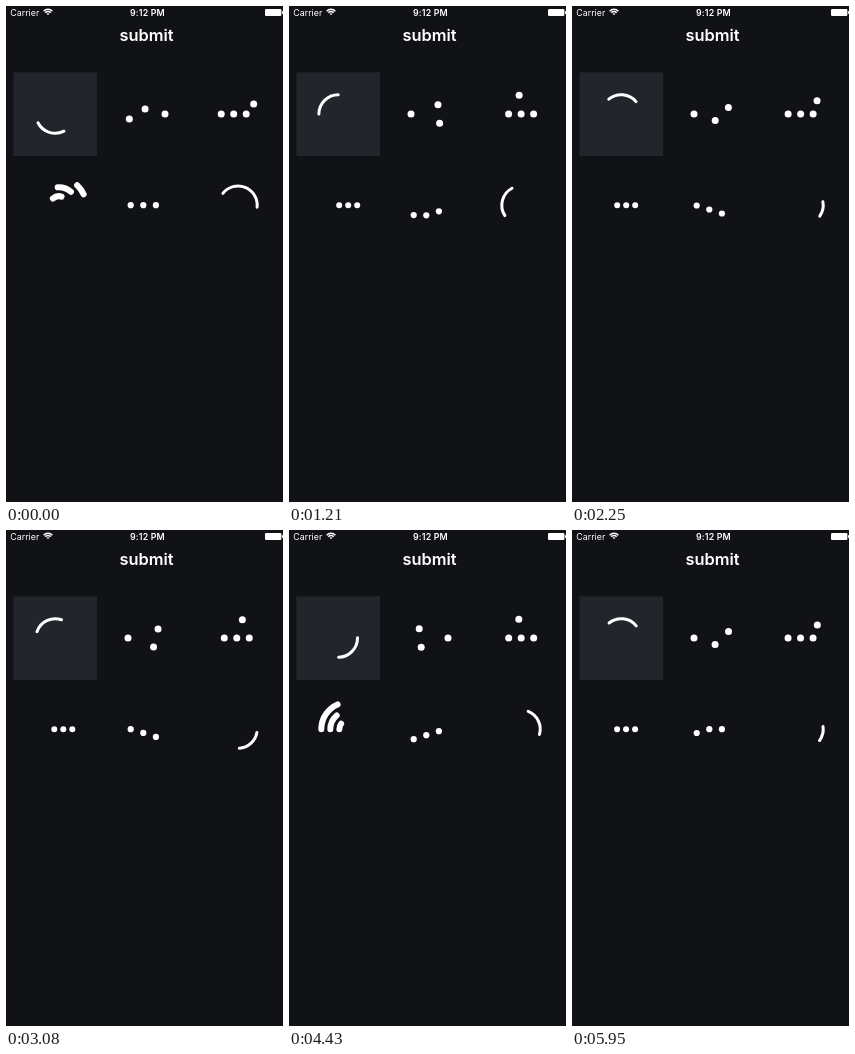
These frames come from a looping animation (277x496 px, 6.05 s). An HTML page:

```html
<!DOCTYPE html>
<html lang="en">
<head>
<meta charset="utf-8">
<title>submit</title>
<style>
  html, body { margin: 0; width: 100%; height: 100%; overflow: hidden; background: #111216; }
  svg { display: block; width: 277px; height: 496px; }
  text { font-family: Inter, Roboto, sans-serif; fill: #fff; }
  .line { fill: none; stroke: #fff; stroke-linecap: round; }
</style>
</head>
<body>
<svg id="stage" viewBox="0 0 277 496">
  <rect width="277" height="496" fill="#111216"/>
  <text x="4.3" y="9.7" font-size="8.86">Carrier</text>
  <g id="wifi"></g>
  <text x="141.5" y="9.7" font-size="8.86" font-weight="600" letter-spacing=".15" text-anchor="middle">9:12 PM</text>
  <rect x="259" y="3" width="16.4" height="7" rx="1.2" fill="#fff"/>
  <rect x="276" y="5.2" width="1" height="2.6" fill="#fff"/>
  <text x="140.5" y="34.7" font-size="16.4" font-weight="600" text-anchor="middle">submit</text>
  <rect x="7.4" y="66.4" width="83.6" height="83.6" fill="#22252c"/>
</svg>
<script>
const stage = document.getElementById('stage');
const ROW1 = 108, ROW2 = 199.2;
const LOOP = 6050, LAST = 5950, STEP = 27.7;

// Playback pace: [clock ms, animation seconds]
const PACE = [[0, 0], [1210, 1.325], [2250, 2.464], [3080, 3.378],
              [4430, 4.822], [5240, 5.678], [LAST, 6.467]];

const frac = x => x - Math.floor(x);
const clamp = x => Math.min(1, Math.max(0, x));

function add(name, attrs, parent = stage) {
  const el = document.createElementNS('http://www.w3.org/2000/svg', name);
  for (const key in attrs) el.setAttribute(key, attrs[key]);
  return parent.appendChild(el);
}
const dots = (n, r) => Array.from({ length: n }, () => add('circle', { r, fill: '#fff' }));
const line = (width, parent) => add('path', { class: 'line', 'stroke-width': width }, parent);

function place(dot, x, y) {
  dot.setAttribute('cx', x.toFixed(2));
  dot.setAttribute('cy', y.toFixed(2));
}

const polar = (cx, cy, r, deg) => {
  const a = deg * Math.PI / 180;
  return [cx + r * Math.cos(a), cy + r * Math.sin(a)];
};

// Clockwise arc between two angles in degrees
function arc(path, cx, cy, r, from, to) {
  to = Math.max(to, from + 0.2);
  const a = polar(cx, cy, r, from).map(v => v.toFixed(3));
  const b = polar(cx, cy, r, to).map(v => v.toFixed(3));
  path.setAttribute('d', `M${a}A${r} ${r} 0 ${to - from > 180 ? 1 : 0} 1 ${b}`);
}

// cubic-bezier(.42, 0, .58, 1)
function easeInOut(x) {
  x = clamp(x);
  let lo = 0, hi = 1;
  for (let i = 0; i < 20; i++) {
    const m = (lo + hi) / 2, n = 1 - m;
    if (1.26 * n * n * m + 1.74 * n * m * m + m * m * m < x) lo = m; else hi = m;
  }
  return lo * lo * (3 - 2 * lo);
}

const wifi = document.getElementById('wifi');
for (const r of [6, 3.7, 1.4]) {
  const p = line(1.5, wifi);
  p.style.strokeLinecap = 'butt';
  arc(p, 42, 9.3, r, 223, 317);
}

const submitArc = line(3);
const glassDots = dots(3, 3.5);
const walkDots = dots(4, 3.5);
const archLines = [27, 18, 9].map(() => line(6));
const bounceDots = dots(3, 3.1);
const orbitArc = line(3);

function drawSubmit(s) {
  const a = 63 + 360 * s;
  arc(submitArc, 49.2, ROW1, 19.3, a, a + 90);
}

// Two neighbours swap places by half a turn, right pair then left pair
function drawGlasses(q) {
  const right = q < 0.5;
  const cx = right ? 149.8 : 131.2, angle = 360 * q;
  place(glassDots[0], right ? 122 : 159, ROW1);
  place(glassDots[1], ...polar(cx, ROW1, 9.3, angle));
  place(glassDots[2], ...polar(cx, ROW1, 9.3, angle + 180));
}

// The first dot leaps over the row while the rest shift left
function drawWalk(q) {
  const p = frac(2 * q);
  for (let i = 0; i < 3; i++) place(walkDots[i], 225.5 + 12.5 * (i - p), ROW1);
  place(walkDots[3], ...polar(231.8, ROW1, 18.75, 180 + 180 * p));
}

// Rainbow arcs drift left; inner ones take longer
function drawArch(u) {
  const cx = 67.7 - 36 * u;
  const headTime = [0.55, 0.64, 0.74], tailTime = [0.25, 0.33, 0.45];
  archLines.forEach((path, i) => {
    const head = easeInOut(u / headTime[i]);
    const tail = Math.min(head, easeInOut((u - 0.25) / tailTime[i]));
    arc(path, cx, ROW2, 27 - 9 * i, 180 + 180 * tail, 180 + 180 * head);
  });
}

function drawBounce(s) {
  bounceDots.forEach((dot, i) => {
    const p = 0.9 * frac((s - 0.072 - 0.1 * i) / 0.9);
    const drop = Math.max(0, 12 * (1 - Math.abs(p - 0.3) / 0.3));
    place(dot, 124.7 + 12.6 * i, ROW2 + drop);
  });
}

function drawOrbit(s, u) {
  const base = 218 + 90 * s;
  arc(orbitArc, 232, ROW2, 19.2, base + 360 * Math.max(0, 2 * u - 1), base + 360 * u);
}

function seconds(t) {
  t = Math.min(t, LAST);
  let i = 1;
  while (i < PACE.length - 1 && t >= PACE[i][0]) i++;
  const [t0, s0] = PACE[i - 1], [t1, s1] = PACE[i];
  const n = Math.round((t1 - t0) / STEP);
  const k = Math.floor((t - t0) / (t1 - t0) * n + 0.05);
  return s0 + (s1 - s0) * k / n;
}

function draw(t) {
  const s = seconds(t);
  const q = frac(s - 0.089), u = frac(q + 0.5);
  drawSubmit(s);
  drawGlasses(q);
  drawWalk(q);
  drawArch(u);
  drawBounce(s);
  drawOrbit(s, u);
}

const start = performance.now();
function tick() {
  draw((performance.now() - start) % LOOP);
  requestAnimationFrame(tick);
}
tick();
</script>
</body>
</html>
```
